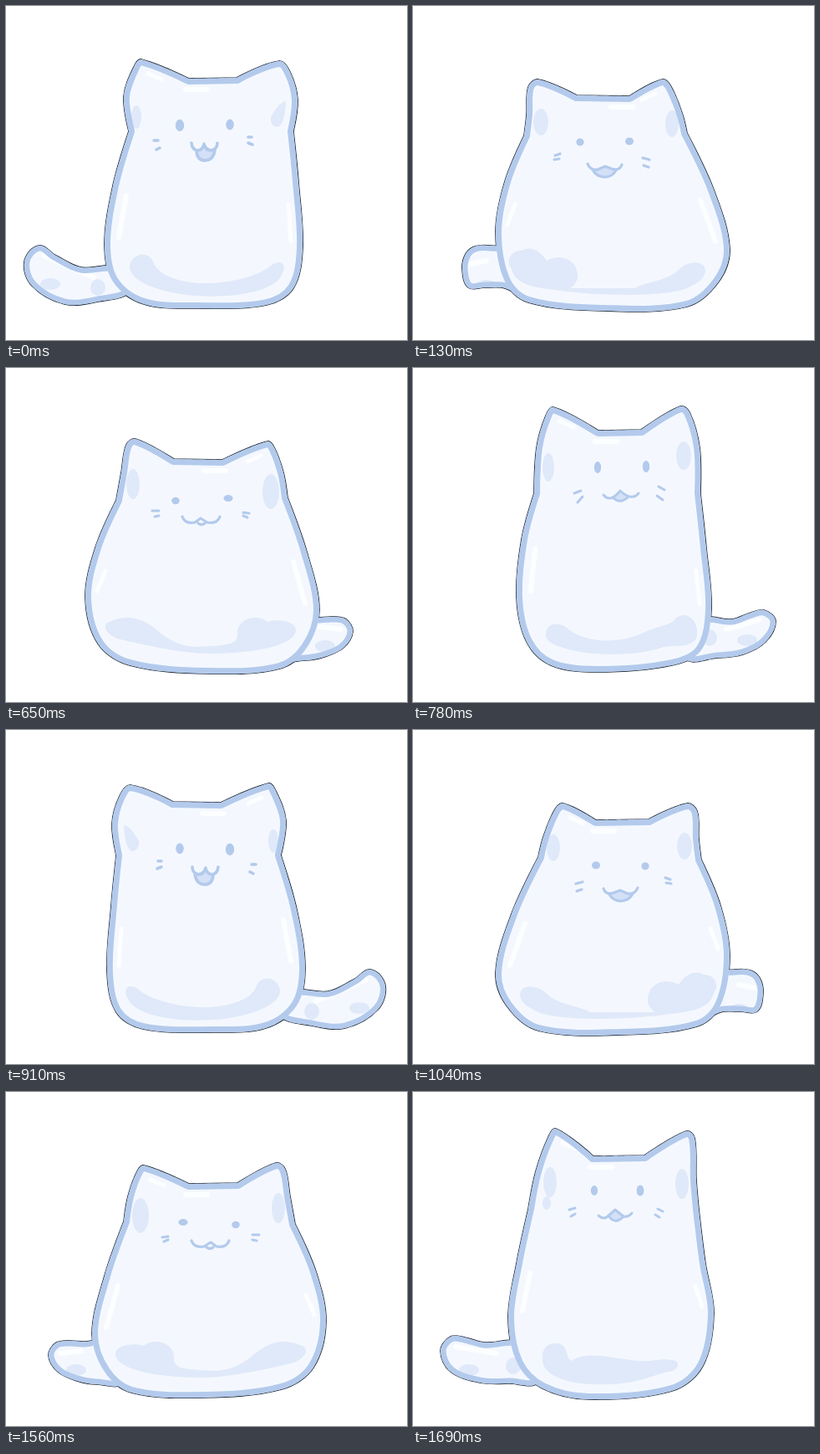
An HTML page with a canvas that plays this animation: 480 by 400 pixels, repeating every 1820 ms.

```html
<!DOCTYPE html>
<html lang="en">
<head>
<meta charset="utf-8">
<title>Jelly cat</title>
<style>
  html, body { margin: 0; width: 100%; height: 100%; overflow: hidden; background: #fff; }
  canvas { display: block; width: 480px; height: 400px; }
</style>
</head>
<body>
<canvas id="stage"></canvas>
<script>
const STEP = 130;
const BLUE = '#b3caec', FILL = '#f4f8fe', SHADE = '#e0e9f9', TONGUE = '#d3e0f6', SHINE = '#fcfeff', EDGE = '#1d2733';

const canvas = document.getElementById('stage');
const ctx = canvas.getContext('2d');
const ratio = window.devicePixelRatio || 1;
canvas.width = 480 * ratio;
canvas.height = 400 * ratio;

// Body points run clockwise from the notch under the left ear.
const CORNERS = [0, 4, 5, 9];
const points = text => text.split(' ').map(p => p.split(',').map(Number));

function pose(body, tail, shade, eyes, lines, tongue, weight = 3.6) {
  return {
    body: points(body), tail: tail && points(tail), shade: new Path2D(shade),
    eyes: eyes && points(eyes), lines: new Path2D(lines), tongue: new Path2D(tongue), weight
  };
}

const oval = (x, y, rx, ry) => `M${x - rx},${y}a${rx},${ry} 0 1 0 ${2 * rx},0a${rx},${ry} 0 1 0 ${-2 * rx},0Z`;

const smile = pose(
  '147,150 141,108 154,71 162,64 219,87 276,86 327,66 340,79 349,112 344,150 350,210 355,290 344,338 312,358 230,362 165,357 128,330 118,285 128,215',
  '135,313 90,313 60,299 39,287 22,306 31,335 70,357 110,354 150,340',
  'M148,312C150,296 170,292 176,306C182,325 215,333 245,332C285,330 310,318 318,310C332,302 336,312 330,322C322,342 270,352 215,346C175,340 148,328 148,312Z' +
  'M317,133Q327,115 335,114Q334,140 326,145Q316,145 317,133Z' + oval(156, 133, 6, 14),
  '208,143,5.2,7.2 268,142,4.8,6.5',
  'M222,164q1,9 8,9q6,-1 7,-8q2,8 8,8q8,-1 8,-9M228,174Q229,185 238,185Q248,185 250,173M177,161h5M180,172l4,-2M290,157h4M290,164l5,2',
  'M228,173L237,167L250,173Q248,185 238,185Q229,185 228,173Z');

const wink = pose(
  '135,171 134,152 143,124 152,118 220,148 268,147 337,121 355,126 357,142 355,163 391,218 409,272 397,325 360,353 235,358 150,365 100,342 78,290 96,218',
  '',
  'M103,313C102,303 115,303 122,309C150,326 175,340 212,344C175,347 112,335 103,313Z' +
  'M210,335C210,320 220,306 237,306C252,306 264,322 264,332C258,340 220,340 210,335Z' +
  'M300,340C330,330 350,315 366,295C376,286 386,290 384,304C376,326 330,335 300,340Z' +
  oval(153, 168, 7, 13) + oval(336, 167, 8, 13),
  '220,195,8.5,4.4',
  'M299,184L279,193L300,197M222,213C222,226 240,226 253,220C266,226 286,226 286,215M182,215h6M183,224l4,-1M326,210h5M326,218l5,1',
  '');

const sitRight = pose(
  '145,150 148,95 159,57 168,47 222,75 273,74 320,46 331,53 343,95 344,150 351,215 357,290 345,338 310,356 220,364 165,356 136,328 124,275 130,205',
  '345,301 382,301 402,294 420,290 434,303 422,328 395,343 365,347 325,346',
  'M159,318C160,303 178,304 186,313C205,328 245,333 280,315C305,306 312,306 314,300C325,290 340,300 340,315C342,335 320,332 300,334C270,345 220,345 190,338C168,332 158,328 159,318Z' +
  oval(162, 119, 7, 17) + oval(324, 105, 9, 17),
  '221,119,4.2,7 279,118,4.2,7',
  'M228,152Q236,162 248,147Q262,160 270,150M239,155Q248,164 258,154M193,150l8,-3M197,161l6,-7M294,142l7,4M292,153l7,5',
  'M239,155L248,147L258,154Q248,164 239,155Z', 3);

const sinkRight = pose(
  '150,152 156,128 170,95 180,88 219,108 282,107 328,88 340,97 342,130 345,155 368,210 379,270 368,330 340,355 250,365 150,360 112,330 99,290 118,220',
  '360,293 385,287 404,288 415,297 419,315 412,337 392,337 372,337 345,342',
  'M128,318C128,302 152,306 160,316C175,330 200,330 212,338L290,338C278,330 280,320 284,311C292,300 305,298 318,305C328,290 340,288 348,293C360,292 368,305 360,315C355,338 320,338 300,341C250,348 175,348 150,338C138,332 130,328 128,318Z' +
  oval(168, 141, 8, 16) + oval(325, 139, 9, 16),
  '219,162,5,4.6 278,163,4.6,4.6',
  'M228,190Q231,198 240,195L248,192L257,196Q266,197 269,189M235,197Q240,205 249,205Q259,204 263,196M195,184l8,-2M196,193l6,-2M302,177l6,2M303,183l6,1',
  'M235,197L248,192L263,196Q259,204 249,205Q240,205 235,197Z', 3.2);

const laugh = pose(
  '140,180 131,150 136,124 144,119 226,148 284,141 338,116 352,120 355,140 352,165 378,225 394,285 380,330 340,352 240,357 150,363 106,340 82,290 101,222',
  '',
  'M113,305C115,290 135,294 140,308C150,330 165,328 180,326C200,324 215,340 245,343C220,348 170,344 150,336C130,328 112,322 113,305Z' +
  'M300,342C330,338 328,318 332,300C340,282 362,278 368,290C372,310 365,335 345,338Z' +
  'M152,160Q172,168 174,180Q172,196 168,193Q155,180 152,160ZM342,147Q322,155 321,172Q328,185 338,172Q345,160 342,147Z' +
  oval(256, 321, 19, 15) + oval(376, 297, 5, 7),
  '',
  'M202,203L225,212L207,217M299,197L282,212L306,215M225,233Q229,242 240,240Q250,238 256,234Q262,241 275,239Q284,238 285,231M242,240C240,255 248,263 257,263C268,262 271,252 269,239M255,237v9M174,227l7,1M174,237l6,-2M326,215h7M327,224h5',
  'M242,240L256,234L269,239C271,252 268,262 257,263C248,263 240,255 242,240Z');

const riseLeft = pose(
  '141,155 146,125 157,95 165,88 219,110 277,109 323,85 334,92 340,125 346,158 371,215 383,275 368,330 330,356 235,366 150,360 118,335 103,290 118,220',
  '120,298 95,299 75,298 59,301 51,316 62,335 85,346 108,350 140,347',
  'M131,315C130,302 155,300 165,304C175,295 198,298 201,315C200,330 205,332 250,334C285,332 295,312 312,304C330,295 345,300 352,303C364,306 360,318 345,324C320,330 270,342 235,342C190,342 135,335 131,315Z' +
  oval(161, 148, 10, 21) + oval(326, 139, 8, 18),
  '212,156,5.6,4 275,159,4.8,4.2',
  'M222,178Q225,187 237,185L245,180L252,185Q264,187 267,178M240,186q4,3 8,0M187,174l7,-1M189,179l5,-2M295,171h8M295,177l5,1',
  '', 3.2);

const sitLeft = pose(
  '138,140 147,95 162,54 171,44 216,77 277,76 327,47 337,55 339,105 342,140 350,205 360,265 347,328 310,358 210,368 155,355 125,325 114,270 124,205',
  '130,301 85,300 62,294 45,293 33,310 45,335 80,348 115,349 150,346',
  'M155,322C152,300 172,297 180,304C186,312 184,320 190,322C205,310 235,318 255,320C280,326 295,318 310,321C322,322 318,335 305,335C285,340 265,350 235,350C200,352 157,345 155,322Z' +
  oval(164, 108, 8, 18) + oval(160, 133, 5, 8) + oval(322, 110, 8, 18),
  '217,118,4.2,6 272,118,4.4,6.6',
  'M222,148Q229,154 234,148L242,141L252,149Q258,150 262,145M234,148Q242,160 252,149M187,141l7,-2M189,149l5,-3M293,140l6,3M290,147l5,3',
  'M234,148L242,141L252,149Q242,160 234,148Z', 3);

// In-between: blended outline, with the markings stretched to suit.
function blend(a, b, k, sx, sy) {
  const body = b.body.map((p, i) => p.map((v, j) => a.body[i][j] * (1 - k) + v * k));
  return { ...b, body, tail: null, sx, sy };
}
const flip = (p, width, tailShift = 0) => ({ ...p, width, tailShift });

const cycle = [
  smile, flip(sinkRight, 478), blend(sinkRight, wink, 0.65, 0.96, 1.05), wink,
  blend(riseLeft, wink, 0.6, 0.95, 1.05), flip(riseLeft, 478, 12), sitRight,
  flip(smile, 476), sinkRight, blend(sinkRight, laugh, 0.65, 0.97, 1.05), laugh,
  blend(riseLeft, laugh, 0.6, 0.96, 1.05), riseLeft, sitLeft
];

function smooth(pts, corners) {
  const n = pts.length, path = new Path2D();
  const dir = pts.map((p, i) => {
    if (corners.includes(i)) return [0, 0];
    const a = pts[(i + n - 1) % n], b = pts[(i + 1) % n];
    const len = Math.hypot(b[0] - a[0], b[1] - a[1]);
    return [(b[0] - a[0]) / len, (b[1] - a[1]) / len];
  });
  path.moveTo(...pts[0]);
  pts.forEach((p, i) => {
    const j = (i + 1) % n, q = pts[j];
    const h = Math.hypot(q[0] - p[0], q[1] - p[1]) / 3;
    path.bezierCurveTo(p[0] + dir[i][0] * h, p[1] + dir[i][1] * h,
      q[0] - dir[j][0] * h, q[1] - dir[j][1] * h, ...q);
  });
  path.closePath();
  return path;
}

function stroke(path, color, width) {
  ctx.strokeStyle = color;
  ctx.lineWidth = width;
  ctx.stroke(path);
}

function fill(path, color) {
  ctx.fillStyle = color;
  ctx.fill(path);
}

function shine(x1, y1, x2, y2, width) {
  stroke(new Path2D(`M${x1},${y1}L${x2},${y2}`), SHINE, width);
}

// Fill a shape and keep its rim inside the outline.
function jelly(path, rim, inside) {
  ctx.save();
  ctx.clip(path);
  fill(path, FILL);
  inside();
  stroke(path, BLUE, rim * 2);
  ctx.restore();
}

function tailMarks(tail) {
  const [root, , , tip, end, low, belly] = tail;
  const side = Math.sign(end[0] - root[0]);
  shine(tip[0] - side * 6, tip[1] + 12, root[0] + side * 30, root[1] + 12, 6);
  fill(new Path2D(oval(low[0] - side * 22, low[1] - 2, 12, 7)), SHADE);
  fill(new Path2D(oval(belly[0] - side * 40, belly[1] - 20, 9, 10)), SHADE);
}

function bodyMarks(p) {
  const b = p.body;
  shine(b[17][0] + 17, b[17][1] - 8, b[18][0] + 16, b[18][1] + 12, 6);
  shine(b[11][0] - 14, b[11][1] - 8, b[10][0] - 12, b[10][1] + 28, 5);
  shine(b[4][0] - 4, b[4][1] + 13, b[4][0] + 22, b[4][1] + 13, 6);
  shine(b[3][0] + 8, b[3][1] + 17, b[3][0] + 24, b[3][1] + 24, 5);
}

function draw(p) {
  ctx.setTransform(ratio, 0, 0, ratio, 0, 0);
  ctx.fillStyle = '#fff';
  ctx.fillRect(0, 0, 480, 400);
  ctx.lineCap = ctx.lineJoin = 'round';
  if (p.width) ctx.transform(-1, 0, 0, 1, p.width, 0);

  const body = smooth(p.body, CORNERS);
  const tailPts = p.tail && p.tail.map(([x, y]) => [x + (p.tailShift || 0), y]);
  const tail = tailPts && smooth(tailPts, []);
  if (tail) stroke(tail, EDGE, 1.6);
  stroke(body, EDGE, 1.6);
  if (tail) jelly(tail, 6.5, () => tailMarks(tailPts));

  jelly(body, 7, () => {
    bodyMarks(p);
    ctx.translate(238, 362);
    ctx.scale(p.sx || 1, p.sy || 1);
    ctx.translate(-238, -362);
    fill(p.shade, SHADE);
    fill(p.tongue, TONGUE);
    stroke(p.lines, BLUE, p.weight);
    for (const e of p.eyes || []) fill(new Path2D(oval(...e)), BLUE);
    ctx.translate(238, 362);
    ctx.scale(1 / (p.sx || 1), 1 / (p.sy || 1));
    ctx.translate(-238, -362);
  });
}

const start = performance.now();
let shown = -1;
function tick() {
  const i = Math.floor((performance.now() - start) / STEP) % cycle.length;
  if (i !== shown) draw(cycle[shown = i]);
  requestAnimationFrame(tick);
}
tick();
</script>
</body>
</html>
```
